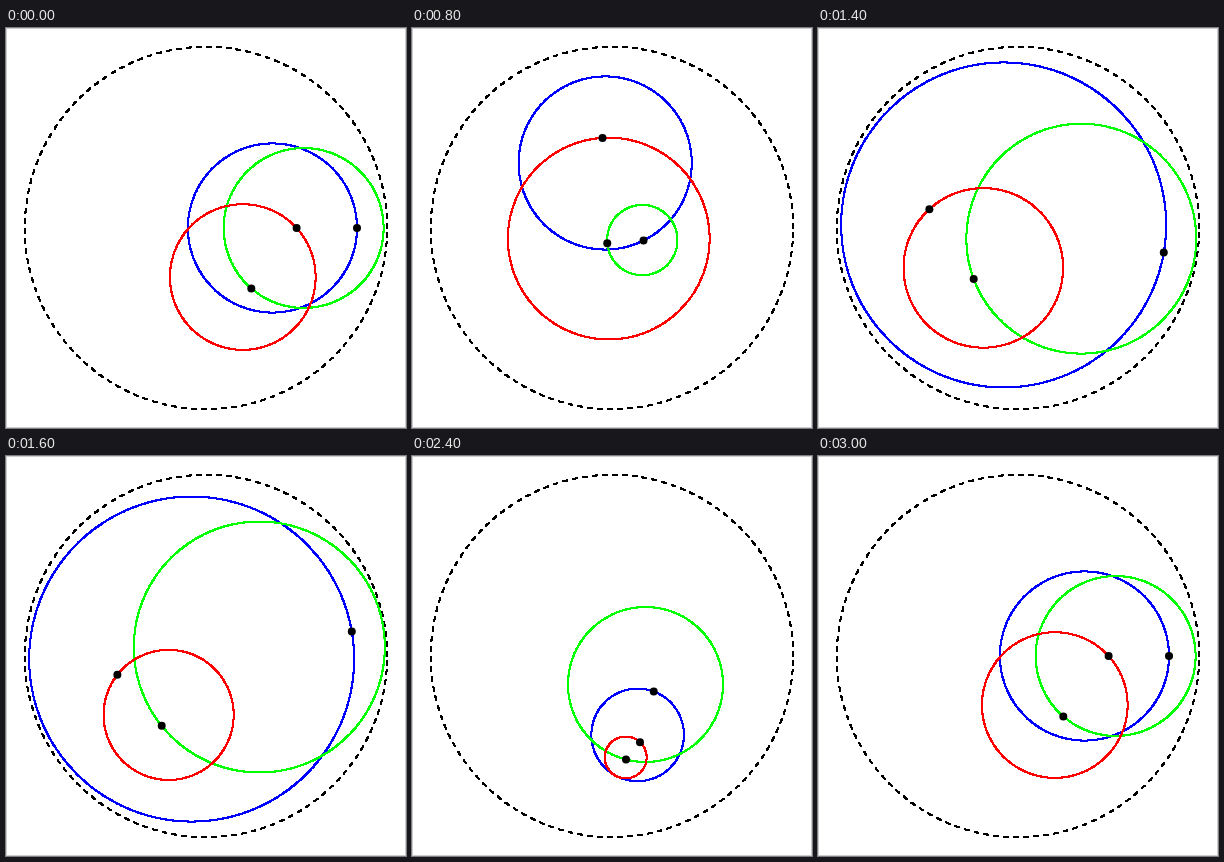
An HTML page with a canvas that plays this animation: 400 by 400 pixels, repeating every 3.1 s.

```html
<!DOCTYPE html>
<html lang="en">
<head>
<meta charset="utf-8">
<title>Hyperbolic circles</title>
<style>
  html, body { margin: 0; width: 100%; height: 100%; overflow: hidden; background: #fff; }
  canvas { display: block; }
</style>
</head>
<body>
<canvas id="stage" width="400" height="400"></canvas>
<script>
const ctx = document.getElementById('stage').getContext('2d');
const LOOP = 3100, STEP = 100, STEPS = 30;
const MID = 200, UNIT = 181.2;
const DASH = 4, PITCH = 10;

// A point travelling round a small Euclidean circle, in unit disk coordinates.
const orbit = (cx, cy, r, angle) => ({
  x: cx + r * Math.cos(angle),
  y: cy + r * Math.sin(angle)
});

// Poincaré disk circle with hyperbolic centre c, passing through p.
function hyperbolicCircle(c, p) {
  const c2 = c.x * c.x + c.y * c.y;
  const dx = p.x - c.x, dy = p.y - c.y;
  const re = 1 - (c.x * p.x + c.y * p.y);
  const im = c.x * p.y - c.y * p.x;
  const rho2 = (dx * dx + dy * dy) / (re * re + im * im);
  const k = 1 - rho2 * c2;
  return {
    x: c.x * (1 - rho2) / k,
    y: c.y * (1 - rho2) / k,
    r: Math.sqrt(rho2) * (1 - c2) / k
  };
}

// Stamps a hard-edged 2px pen along the circle.
function strokeCircle({ x, y, r }, color, dashed = false) {
  const cx = MID + UNIT * x, cy = MID - UNIT * y, radius = UNIT * r;
  const length = 2 * Math.PI * radius;
  ctx.fillStyle = color;
  for (let s = 0; s < length; s += 0.5) {
    if (dashed && s % PITCH > DASH) continue;
    const px = Math.round(cx + radius * Math.cos(s / radius));
    const py = Math.round(cy - radius * Math.sin(s / radius));
    ctx.fillRect(px - 1, py - 1, 2, 2);
  }
}

function drawPoint({ x, y }) {
  ctx.beginPath();
  ctx.arc(MID + UNIT * x, MID - UNIT * y, 4, 0, 2 * Math.PI);
  ctx.fillStyle = '#000';
  ctx.fill();
}

function draw(time) {
  const angle = 2 * Math.PI * Math.floor((time % LOOP) / STEP) / STEPS;
  const a = orbit(1 / 2, 0, 1 / 3, 2 * angle);
  const b = orbit(0, 0, 1 / 2, angle);
  const c = orbit(0, -1 / 3, 1 / 4, angle);

  ctx.fillStyle = '#fff';
  ctx.fillRect(0, 0, 400, 400);
  ctx.strokeStyle = '#ccc';
  ctx.strokeRect(0.5, 0.5, 399, 399);

  strokeCircle({ x: 0, y: 0, r: 1 }, '#000', true);
  strokeCircle(hyperbolicCircle(b, a), '#00f');
  strokeCircle(hyperbolicCircle(a, c), '#0f0');
  strokeCircle(hyperbolicCircle(c, b), '#f00');
  [a, b, c].forEach(drawPoint);
}

const start = performance.now();
function tick() {
  draw(performance.now() - start);
  requestAnimationFrame(tick);
}
tick();
</script>
</body>
</html>
```
